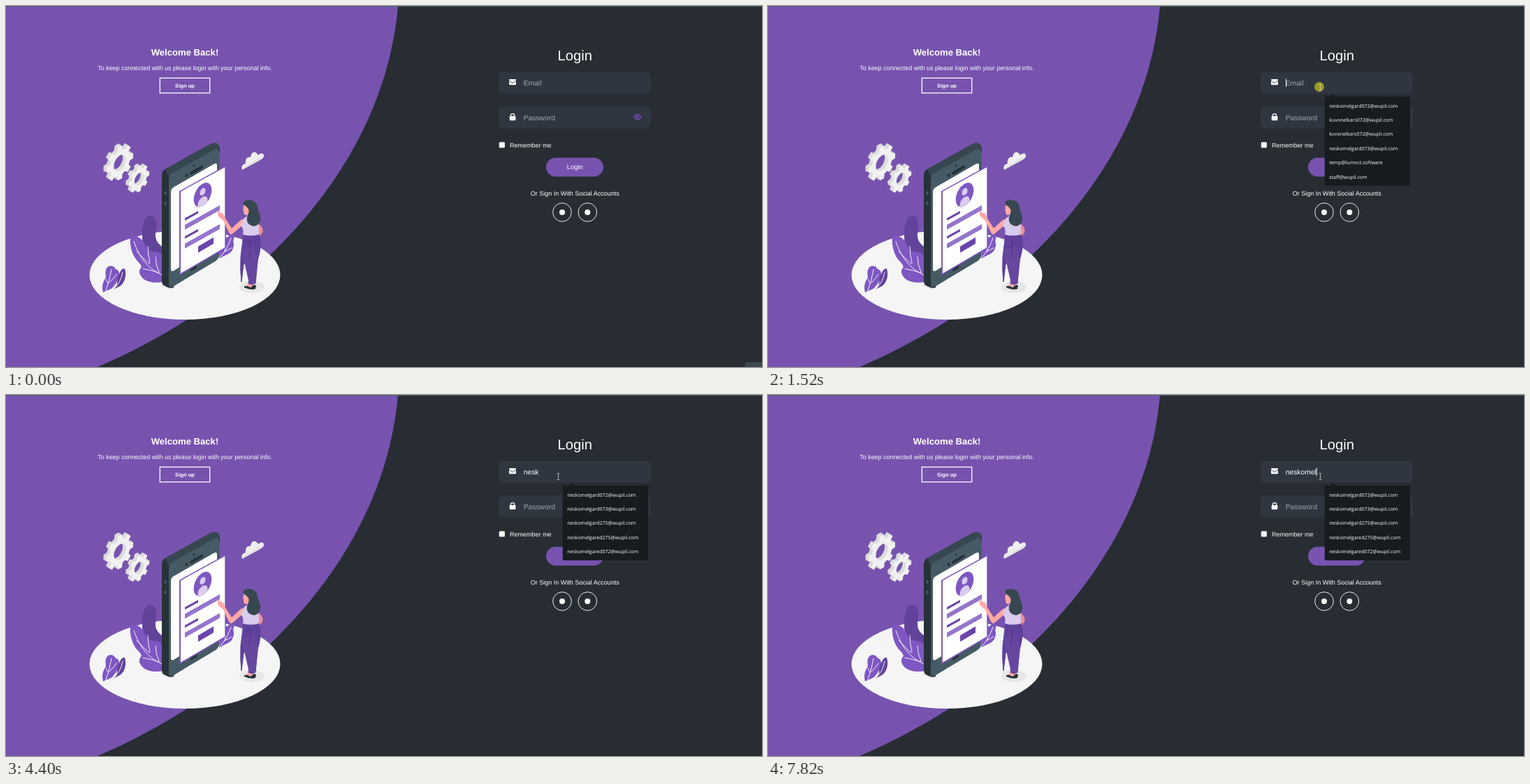
Recreate the animation shown at these times as an HTML page. Size 1082 by 518 pixels, loop 8000 ms.

```html
<!DOCTYPE html>
<html lang="en">
<head>
<meta charset="utf-8">
<title>Login</title>
<style>
  html, body { margin: 0; width: 100%; height: 100%; overflow: hidden; background: #272d33; }
  svg { display: block; width: 100vw; height: 100vh; }
  text { font: 9px "Liberation Sans", Arial, sans-serif; fill: #fff; text-rendering: geometricPrecision; }
  .mid { text-anchor: middle; }
  .input { font-size: 10.3px; }
  .hint { fill: #a3a6ab; }
  #popup text { font: 7px "Open Sans", "Noto Sans", sans-serif; }
  .vein { fill: none; stroke: #fff; stroke-width: .9; stroke-linecap: round; }
</style>
</head>
<body>
<svg viewBox="0 0 1082 518" preserveAspectRatio="none">
  <rect width="1082" height="518" fill="#272d33"/>
  <path d="M0 0H561C542 220 372 414 131 518H0Z" fill="#7753af"/>
  <rect width="1082" height="1" fill="#53636c"/>
  <rect id="corner" x="1058" y="511" width="24" height="7" fill="#3b484f"/>

  <!-- welcome panel -->
  <text class="mid" x="256" y="71" style="font-size:13.1px;font-weight:700">Welcome Back!</text>
  <text class="mid" x="256" y="92" style="font-size:8.93px">To keep connected with us please login with your personal info.</text>
  <rect x="220.3" y="103.4" width="71.4" height="21.4" fill="none" stroke="#fff" stroke-width="1.3"/>
  <text class="mid" x="256" y="116.5" style="font-size:7.6px;font-weight:700">Sign up</text>

  <!-- ground and plants -->
  <ellipse cx="256" cy="386" rx="136.5" ry="64" fill="#f5f5f5"/>
  <path d="M221 401L232 396 244 401 234 406Z" fill="#e0e0e0"/>
  <ellipse cx="352" cy="403.5" rx="18" ry="8.5" fill="#e7e7e7"/>
  <path d="M197 352C193 325 195 302 206 301C217 301 216 316 214 326C213 336 218 342 226 347V360L204 356Z" fill="#62439b"/>
  <path d="M178 331C188 327 196 335 199 343C202 351 208 353 215 353C222 354 225 359 225 365L229 394C218 399 203 397 196 391C191 386 189 380 193 376C196 372 188 367 185 362C179 353 177 341 178 331Z" fill="#7e57c2"/>
  <path class="vein" d="M183 338C191 361 203 378 226 387M203 345Q203 357 206 369M187 352Q194 360 205 370M214 360Q214 371 219 382M196 377Q208 379 219 383"/>
  <path d="M139 411C136 399 141 393 143 389C141 379 144 373 150 373C156 373 155 377 158 378C164 380 162 389 160 393C157 399 154 402 152 405Z" fill="#7e57c2"/>
  <path d="M153 407C162 402 157 392 162 385C164 380 166 376 170 377C173 387 170 397 163 402Z" fill="#62439b"/>
  <path class="vein" d="M142 411Q148 396 151 378M146 398L143 392M148 397Q154 391 158 385M154 406Q164 398 167 382"/>

  <g id="gears"></g>
  <path d="M338 235C336 230 339 227 343 226C342 220 345 216 350 217C351 209 357 207 361 214C365 210 370 211 369 216C368 219 365 220 362 222Z" fill="#efefef"/>
  <path d="M338 235Q341 229 347 227Q354 225 357 220Q362 220 367 216Q367 219 362 222Z" fill="#e1e1e1"/>

  <!-- phone -->
  <path d="M223 243Q223 237 228 234L291 199Q299 194 304 199L306 204V210L240 250V404Q235 406 230 403L226 401Q223 399 223 395Z" fill="#263238"/>
  <path d="M228 234L291 199Q299 194 304 199L306 204L240 242 233 245Z" fill="#37474f"/>
  <path d="M233 249Q233 243 238 240L298 206Q305 203 305.500 210V357Q305 362 300 366L240 402Q233 406 233 399Z" fill="#455a64"/>
  <path d="M236 267Q236 262 240 260L297 227Q302 224 302 229V340L240 380Q236 382 236 377Z" fill="#fff"/>
  <path d="M265 240L280 231" stroke="#263238" stroke-width="4" stroke-linecap="round"/>
  <g fill="#263238">
    <ellipse cx="258.500" cy="243" rx="2" ry="2.500"/><circle cx="269" cy="229" r="1.500"/>
    <path d="M264 378L273 372V376L264 381Z"/>
  </g>
  <g fill="#455a64"><ellipse cx="228" cy="268" rx="1.700" ry="2.500"/><ellipse cx="228" cy="283" rx="1.700" ry="2.500"/></g>

  <!-- leaf and card -->
  <path d="M305 362C307 354 303 345 309 342C309 334 314 330 317 332C321 326 328 328 326 334C324 339 328 341 325 347C324 355 314 357 308 361Z" fill="#7e57c2"/>
  <path class="vein" d="M307 360Q317 348 322 333M314 351L312 341M312 353L323 347"/>
  <path d="M249 266L314 230V347L249 385Z" fill="#fff" stroke="#7e57c2" stroke-width="1.500"/>
  <path d="M249 266V384" stroke="#7e57c2" stroke-width="2"/>
  <g transform="matrix(.8 -.43 0 1 281.500 271)">
    <circle r="16" fill="#7e57c2"/>
    <circle cy="-4.500" r="5" fill="#dacdef"/>
    <path d="M-9 13Q-9 3 0 3Q9 3 9 13Q0 19-9 13Z" fill="#dacdef"/>
  </g>
  <g fill="#6b45aa">
    <path d="M256 304.500L275 294V297.500L256 308Z"/><path d="M256 330.500L275 320V323.500L256 334Z"/>
    <path d="M275 345L297 332V341L275 354Z"/>
  </g>
  <g fill="#9575cd"><path d="M256 314L306 286V293L256 321Z"/><path d="M256 341L306 313V320L256 348Z"/></g>

  <!-- woman -->
  <path d="M360 312C365 314 369 320 367 325L359 337 357 333 362 324 357 316Z" fill="#f28f8f"/>
  <path d="M342 305L338 315 324 327Q321 329 319 325L311 308 304 302Q302 297 304 293L306 296 311 298 314 305 323 319 336 307Z" fill="#ffa8a7"/>
  <path d="M348 396L352 396 356 404 343 402Z" fill="#ffa8a7"/>
  <path d="M340 327H362C366 339 364 352 360 365L357 398Q352 401 347 398L350 374 345 362 340 371 337 396Q335 380 336 360Z" fill="#5f419c" stroke="#5f419c"/>
  <path d="M337 350L348 398H357L361 362 355 345Z" fill="#66479f"/>
  <path d="M349 335Q350 347 348 361" fill="none" stroke="#4d327f"/>
  <path d="M341 304L346 301 359 303Q363 315 362 328Q350 331 339 328Q341 320 336 315Z" fill="#d8cbed"/>
  <path d="M341 283Q338 291 341 299Q344 301 345 299L345 304Q350 307 353 303L354 285Z" fill="#ffa8a7"/>
  <path d="M340 285C337 279 346 277 352 279C361 281 359 291 363 298C366 307 363 315 355 316C345 315 343 307 346 300C350 292 346 289 340 285Z" fill="#37474f"/>
  <path d="M341 402Q346 401 350 404L355 400 358 401 357 406Q350 408 341 404Z" fill="#263238"/>

  <!-- form -->
  <text class="mid" x="814.300" y="78.300" style="font-size:20.200px">Login</text>
  <g fill="#2f3640">
    <rect x="705" y="94.500" width="218" height="31.500" rx="6"/>
    <rect x="705" y="144" width="218" height="31.500" rx="6"/>
  </g>
  <rect x="720" y="105" width="10" height="8.300" rx="1.300" fill="#fff"/>
  <path d="M720 107.200L725 110.800 730 107.200" fill="none" stroke="#2f3640" stroke-width=".9"/>
  <rect x="720.700" y="158" width="8.700" height="6.200" rx="1.200" fill="#fff"/>
  <path d="M722.400 159V157.200A2.600 2.600 0 0 1 727.600 157.200V159" fill="none" stroke="#fff" stroke-width="1.400"/>
  <g fill="none" stroke="#7952b3" stroke-width="1.200">
    <path d="M898.700 159.300Q903.700 151.500 908.700 159.300Q903.700 167 898.700 159.300Z"/><circle cx="903.700" cy="159.300" r="1.700"/>
  </g>
  <text id="field" class="input" x="740.700" y="113.700"></text>
  <rect id="caret" y="104.500" width="1" height="11.500" fill="#fff"/>
  <text class="input hint" x="740.700" y="163.500">Password</text>
  <rect x="705.700" y="195.200" width="8.300" height="8.300" rx="1.500" fill="#fff" stroke="#767676" stroke-width=".5"/>
  <text x="721" y="202.600">Remember me</text>
  <rect x="773" y="217.700" width="82" height="27" rx="13.500" fill="#7753af"/>
  <text class="mid" x="814.300" y="234.300" style="font-size:9.400px">Login</text>
  <text class="mid" x="814.300" y="271.700">Or Sign In With Social Accounts</text>
  <g fill="none" stroke="#fff" stroke-width=".9"><circle cx="796" cy="296" r="13.300"/><circle cx="832.300" cy="296" r="13.300"/></g>
  <g fill="#fff"><circle cx="796" cy="296" r="4"/><circle cx="832.300" cy="296" r="4"/></g>

  <g id="popup">
    <path d="M804.500 130.500L808.700 126 813 130.500Z" fill="#171c1f"/>
    <rect id="panel" x="796.700" y="130" width="122.300" rx="2" fill="#171c1f"/>
    <g id="list"></g>
  </g>

  <circle id="click" cx="789" cy="116" r="7" fill="#999a20"/>
  <g id="mouse">
    <path id="arrow" d="M0 0V10.500L2.500 8.200 4.200 12 5.800 11.300 4.200 7.700H7.500Z" fill="#fff" stroke="#111" stroke-width=".5"/>
    <path id="beam" d="M-2-4.500H-.7L0-4 .7-4.500H2M0-4V4M-2 4.500H-.7L0 4 .7 4.500H2" fill="none" stroke="#d5d7d8" stroke-width=".8"/>
  </g>
</svg>
<script>
const $ = id => document.getElementById(id);
const show = (id, on) => $(id).style.display = on ? "" : "none";

function gearPath(r) {
  const pts = [];
  for (let i = 0; i < 8; i++)
    for (const [turn, k] of [[-.32, .76], [-.2, 1], [.2, 1], [.32, .76]]) {
      const a = (i + turn) * Math.PI / 4;
      pts.push(`${Math.cos(a) * r * k} ${Math.sin(a) * r * k}`);
    }
  const h = r * .45;
  return `M${pts.join("L")}ZM${h} 0A${h} ${h} 0 1 0 ${-h} 0A${h} ${h} 0 1 0 ${h} 0Z`;
}

function gear(x, y, r) {
  const layer = (d, fill) =>
    `<path transform="matrix(.8 -.45 0 1 ${x + d} ${y + d * .6})" d="${gearPath(r)}" fill="${fill}" fill-rule="evenodd"/>`;
  return [-2.5, -1.5, -.5, .5].map(d => layer(d, "#dcdcdc")).join("") + layer(2, "#f1f1f1");
}
$("gears").innerHTML = gear(161, 224, 24) + gear(188.5, 247, 18.5);

const DOMAIN = "@wupil.com";
const name = "neskomel";
const allMails = [name + "gard072" + DOMAIN, "kuvonelkars072" + DOMAIN, "kovonelkars072" + DOMAIN,
  name + "gard073" + DOMAIN, "temp@lumoct.software", "staff" + DOMAIN];
const matches = ["gard072", "gard073", "gard275", "gared275", "gared072"].map(s => name + s + DOMAIN);

const keys = [3190, 3290, 3640, 3850, 4710, 5380, 7250, 7820];
const blinks = [1520, 2020, 2540, 3040, 3190, 4400, 4710, 5260, 5380, 5930, 6440, 6990, 7250, 7750, 7820];
const passed = (times, t) => times.filter(x => x <= t).length;

let shown;
function fillList(mails) {
  if (shown === mails) return;
  shown = mails;
  $("panel").setAttribute("height", mails.length * 20.45 + 5);
  $("list").innerHTML = mails.map((m, i) => `<text x="803.3" y="${145.5 + i * 20.45}">${m}</text>`).join("");
}

function moveMouse(t) {
  show("mouse", t >= 340);
  const p = Math.max(0, Math.min(10, Math.floor((t - 340) / 57))) / 10;
  const q = 1 - p;
  const curve = (a, b, c) => q * q * a + 2 * q * p * b + p * p * c;
  const x = curve(996, 760, 790.5), y = curve(407, 215, 117);
  $("mouse").setAttribute("transform", `translate(${x} ${y})`);
  show("arrow", y > 176);
  show("beam", y <= 176);
}

function draw(now) {
  const t = now % 8000;
  show("corner", t < 50);
  moveMouse(t);
  show("click", t >= 1460 && t < 1630);
  show("popup", t >= 1520);
  fillList(t < 3290 ? allMails : matches);

  const typed = name.slice(0, passed(keys, t));
  const field = $("field");
  field.textContent = typed || "Email";
  field.classList.toggle("hint", !typed);
  $("caret").setAttribute("x", 741 + (typed ? field.getComputedTextLength() - .4 : 0));
  show("caret", passed(blinks, t) % 2);
}

const start = performance.now();
function tick() {
  draw(performance.now() - start);
  requestAnimationFrame(tick);
}
tick();
</script>
</body>
</html>
```
